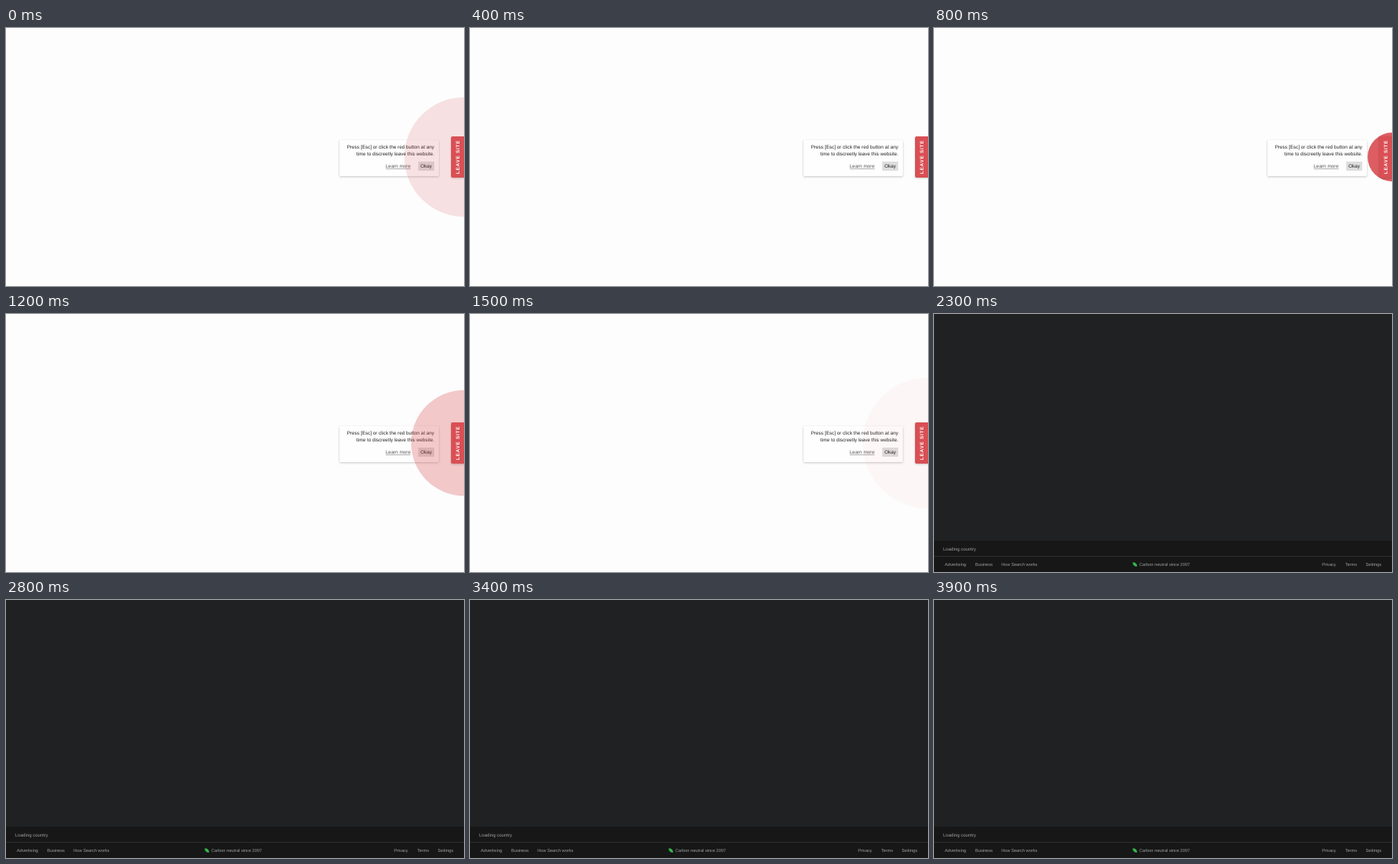
Animation, 600 px wide and 338 px high, one loop 4 s. Source, as an HTML page:

```html
<!DOCTYPE html>
<html lang="en">
<head>
<meta charset="utf-8">
<title>Leave site</title>
<style>
  @property --p {
    syntax: "<number>";
    inherits: false;
    initial-value: 0;
  }
  html, body {
    margin: 0;
    width: 100%;
    height: 100%;
    overflow: hidden;
    background: #fdfdfd;
  }
  svg {
    display: block;
    width: 600px;
    height: 338px;
    font-family: "Liberation Sans", Arial, sans-serif;
    text-rendering: geometricPrecision;
  }
  .card {
    fill: #fefefe;
    filter: drop-shadow(0 1px 1.5px rgba(0, 0, 0, .22));
  }
  .notice { font-size: 6.4px; fill: #222; }
  .end { text-anchor: end; }
  .link { fill: #555; }
  .tab {
    fill: #d94f54;
    filter: drop-shadow(0 1px 1px rgba(0, 0, 0, .2));
  }
  .label {
    font-size: 6.4px;
    font-weight: bold;
    letter-spacing: .75px;
    fill: #fff;
    text-anchor: middle;
  }
  /* Fades as it grows; the rest of each cycle is idle. */
  .pulse {
    fill: #d94f54;
    transform-origin: 600px 169px;
    transform: scale(var(--p));
    opacity: calc(1.44 * (1 - var(--p)));
    animation: pulse calc(4s / 3) -.795s infinite;
  }
  @keyframes pulse {
    0% { --p: 0; animation-timing-function: ease-out; }
    82.5%, 100% { --p: 1; }
  }
  .search {
    visibility: hidden;
    font-size: 5.65px;
    fill: #9c9fa2;
    animation: leave 4s step-end infinite;
  }
  @keyframes leave {
    0% { visibility: hidden; }
    57.5%, 100% { visibility: visible; }
  }
</style>
</head>
<body>
<svg viewBox="0 0 600 338">
  <rect width="600" height="338" fill="#fdfdfd"/>

  <rect class="card" x="437" y="147" width="130" height="47" rx="1"/>
  <rect x="540" y="175" width="21" height="12" fill="#dedede"/>
  <g class="notice">
    <text class="end" x="561" y="157.5">Press [Esc] or click the red button at any</text>
    <text class="end" x="561" y="167">time to discreetly leave this website.</text>
    <text class="end link" x="530" y="183.2">Learn more</text>
    <text x="543" y="183.2">Okay</text>
  </g>
  <path d="M497.5 184.5H530" stroke="#777" stroke-width=".6"/>

  <circle class="pulse" cx="600" cy="169" r="88"/>
  <path class="tab" d="M600 142H585a2 2 0 0 0-2 2V194a2 2 0 0 0 2 2H600Z"/>
  <text class="label" transform="translate(593.6 169) rotate(-90)">LEAVE SITE</text>

  <g class="search">
    <rect width="600" height="338" fill="#202123"/>
    <rect y="297" width="600" height="41" fill="#171717"/>
    <rect y="317" width="600" height="1" fill="#2e2f31"/>
    <text x="12" y="309.5" font-size="6.05">Loading country</text>
    <text x="14" y="330">Advertising</text>
    <text x="54" y="330">Business</text>
    <text x="88.3" y="330">How Search works</text>
    <path d="M260.3 325.2C264 325.3 266.2 327 266 330.8C262.600 331 260.300 329 260.300 325.200Z" fill="#35b34a"/>
    <text x="269" y="330">Carbon neutral since 2007</text>
    <text class="end" x="526.7" y="330">Privacy</text>
    <text class="end" x="554" y="330">Terms</text>
    <text class="end" x="586" y="330">Settings</text>
  </g>
</svg>
</body>
</html>
```
